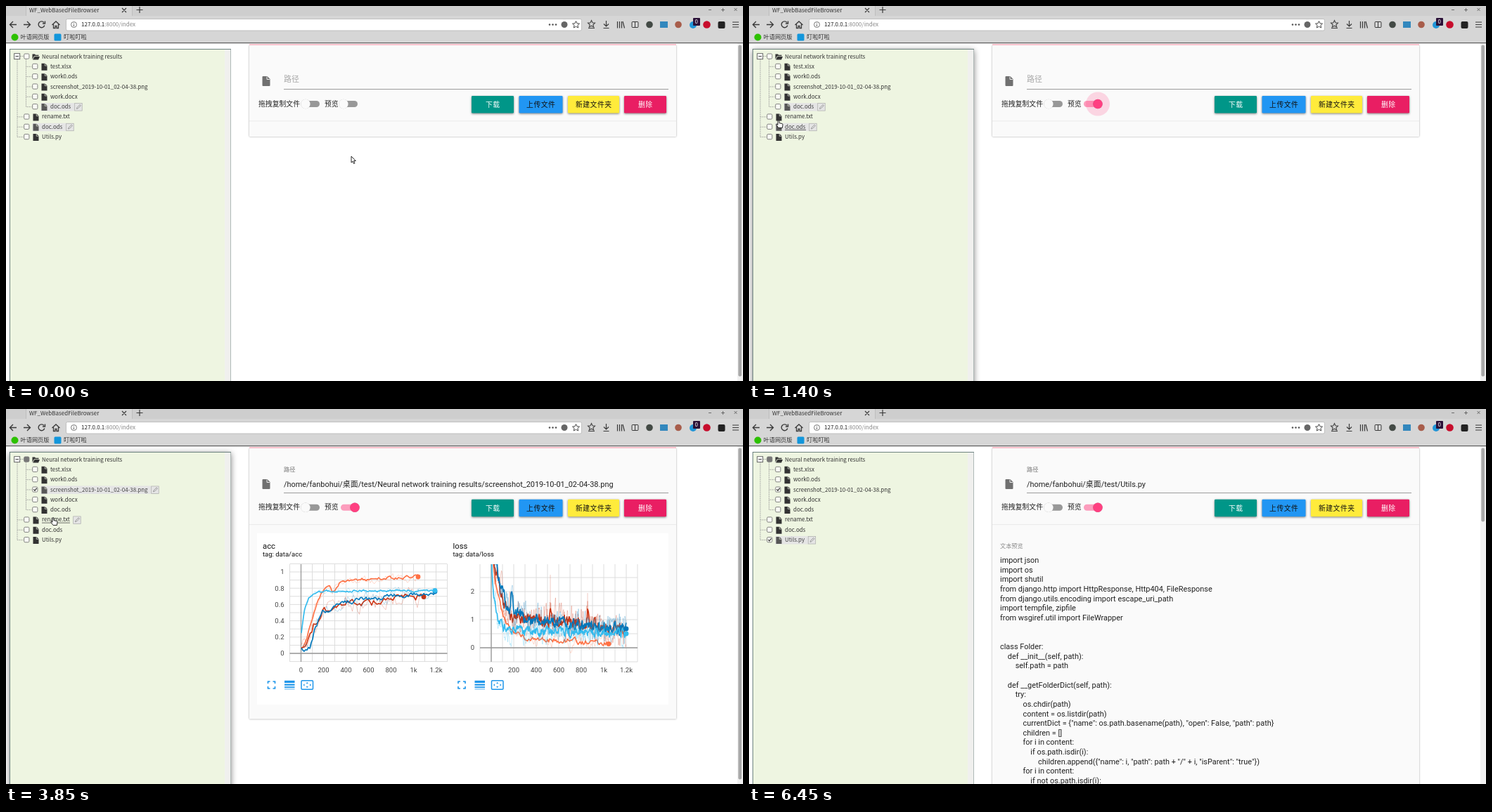
Write an HTML page that moves like this. It is 1048 px wide and 534 px high and loops after 6.5 s.

```html
<!DOCTYPE html>
<html lang="zh">
<head>
<meta charset="utf-8">
<title>File browser</title>
<style>
html, body { margin: 0; width: 100%; height: 100%; overflow: hidden; background: #fff; }
svg { display: block; width: 1048px; height: 534px; }
text { white-space: pre; }
.ui { font-family: "Noto Sans CJK SC", "Noto Sans CJK JP", "Noto Sans CJK", sans-serif; }
.app { font-family: Roboto, "Noto Sans CJK SC", "Noto Sans CJK JP", "Noto Sans CJK", sans-serif; }
</style>
</head>
<body>
<svg id="stage" viewBox="0 0 1048 534"></svg>
<script>
const LOOP = 6500, STEP = 50;
const IMAGE_AT = 2850, CODE_AT = 5050;
const PINK = '#ff4081';

const clamp = v => Math.max(0, Math.min(1, v));
const ramp = (t, start, length) => clamp((t - start) / length);
const smooth = k => k * k * (3 - 2 * k);
const shadow = (y, blur, alpha) => `style="filter:drop-shadow(0 ${y}px ${blur}px rgba(0,0,0,${alpha}))"`;

// Drawing helpers; text is placed by its vertical centre.
const rect = (x, y, w, h, fill, more = '') =>
  `<rect x="${x}" y="${y}" width="${w}" height="${h}" fill="${fill}" ${more}/>`;
const circle = (x, y, r, fill, more = '') => `<circle cx="${x}" cy="${y}" r="${r}" fill="${fill}" ${more}/>`;
const line = (d, stroke, width = 1, more = '') =>
  `<path d="${d}" fill="none" stroke="${stroke}" stroke-width="${width}" ${more}/>`;
const shape = (d, fill, more = '') => `<path d="${d}" fill="${fill}" ${more}/>`;
const label = (x, y, str, size, fill, font = 'ui', more = '') =>
  `<text class="${font}" x="${x}" y="${y + size * .36}" font-size="${size}" fill="${fill}" ${more}>${str}</text>`;
const at = (x, y, content) => `<g transform="translate(${x} ${y})">${content}</g>`;

function browserChrome() {
  const ink = '#3a3a3a';
  const star = 'M0-5L1.5-1.7 5-1.4 2.4 1 3.2 4.5 0 2.7-3.2 4.5-2.4 1-5-1.4-1.5-1.7Z';
  return rect(0, 0, 1048, 53, '#d6d6d6') + rect(0, 0, 1048, 14, '#cecece') + rect(28, 0, 152, 14, '#d6d6d6') +
    line('M28.5 0V14M179.5 0V14', '#b4b4b4', .7) +
    label(33, 6, 'WF_WebBasedFileBrowser', 8, '#333') +
    line('M165 3l6 6m0-6l-6 6M185.5 5.5h9m-4.5-4.5v9', ink, 1.2) +
    line('M999 5.5h4M1017 5.5h5m-2.5-2.5v5M1035.5 3l4 4m0-4l-4 4', '#555', .8) +
    line('M15 26.5H5.5m4.5-4.5L5.5 26.5 10 31M25 26.5h9.5M30 22l4.5 4.5L30 31', ink, 1.4) +
    line('M54 23.5a4.4 4.4 0 1 0 .8 4M55.5 21.5v3.5h-3.5', ink, 1.4) +
    line('M65.5 27l5.5-5 5.5 5M67.5 26v5.5h2.5v-3h2v3h2.5V26', ink, 1.3) +
    rect(85.5, 18.5, 733, 16.5, '#fff', 'rx="2" stroke="#b5b5b5" stroke-width=".8"') +
    circle(96.5, 26.5, 4, 'none', 'stroke="#666" stroke-width=".9"') + line('M96.5 26v3M96.5 24v1', '#666') +
    label(107, 26.5, '127.0.0.1<tspan fill="#888">:8000/index</tspan>', 8, '#222') +
    [773, 777.5, 782].map(x => circle(x, 26.5, 1.3, '#555')).join('') +
    circle(794, 26.5, 4.5, '#666') +
    at(810.5, 26.5, line(star, '#444', 1)) + at(832.5, 25.5, line(star, '#444', 1.1)) +
    line('M828 31.5h9M853.5 21v8m-3.5-3.5l3.5 3.5 3.5-3.5M849.5 31.5h8', ink, 1.2) +
    line('M869.5 22v9.5M872.5 22v9.5M875.5 22v9.5M877 22l2.5 9.5', ink, 1.2) +
    rect(890, 22.5, 9, 8, 'none', 'rx="1" stroke="#3a3a3a"') + line('M894.5 22v9', ink) +
    circle(915, 26.5, 4.8, '#434a45') + rect(930, 22, 11, 9, '#3287bd') +
    circle(956, 26.5, 4.8, '#a85d4b') + circle(977, 27, 5, '#2196d8') +
    rect(977, 17, 10, 11, '#2b1138', 'rx="1"') + label(979.6, 22.5, '0', 8, '#fff') +
    circle(996.5, 26.5, 5.3, '#c70d2c') + rect(1012.5, 22, 10, 10, '#222', 'rx="2"') +
    line('M1033 23h9m-9 3.5h9m-9 3.5h9', ink, 1.2);
}

function bookmarks(t) {
  return (t >= 6000 && t < 6450 ? rect(5, 38.5, 59, 12.5, '#c2c2c2', 'rx="1"') : '') +
    circle(12.5, 44.5, 5, '#2dc100') + label(20.5, 44.5, '叶语网页版', 8.2, '#333') +
    rect(68.5, 39.5, 10, 10, '#1296db', 'rx="1.5"') + label(82, 44.5, '叮啦叮啦', 8.2, '#333') +
    rect(0, 52, 1048, 1.2, '#5c5c5c');
}

// Rows: indent level, name, right end of the name.
const rows = [
  [0, 'Neural network training results', 166], [1, 'test.xlsx', 93], [1, 'work0.ods', 102],
  [1, 'screenshot_2019-10-01_02-04-38.png', 202], [1, 'work.docx', 102], [1, 'doc.ods', 93],
  [0, 'rename.txt', 91], [0, 'doc.ods', 81], [0, 'Utils.py', 79.5]
];
const fileIcon = 'M0 0h5l3 3v7h-8z';

function treeRow([level, name, end], i, t, hovered, selected) {
  const y = 72 + i * 14.32, x = level * 12;
  const checked = i === 3 && t >= IMAGE_AT || i === 8 && t >= CODE_AT;
  const partial = i === 0 && t >= IMAGE_AT;
  const fade = selected ? 'opacity=".8"' : '';
  let out = selected ? rect(x + 37.5, y - 5.5, end - x - 33, 11.5, '#e5e5e5') : '';
  out += rect(x + 25.7, y - 4, 7.2, 7.2, partial ? '#777' : '#fafbf5', 'rx="1.5" stroke="#777" stroke-width=".9"');
  if (checked) out += line(`M${x + 27.3} ${y - .5}l1.7 1.8 2.7-3.6`, '#333', 1.2);
  out += i === 0
    ? at(37.5, y - 3.5, shape('M0 0h3.5l1 1.2H9v1.5H2.5L0 7.5z', '#333') + shape('M3 3.5h7.5L8.5 8H.6z', '#333'))
    : at(x + 38.5, y - 4.5, shape(fileIcon, '#333', fade) + line('M4.8 0v3.2H8', '#eff4e4', .7));
  out += label(x + 51, y - .3, name, 7.94, selected ? '#444' : '#333');
  if (hovered) out += rect(x + 51, y + 3.8, end - x - 51, .7, '#333');
  if (selected || hovered) out += rect(end + 4.7, y - 5, 10.5, 10.5, '#e5e5e5', 'stroke="#aaa" stroke-width=".7"') +
    line(`M${end + 7.5} ${y + 2.8}l.6-1.9 4-4 1.3 1.3-4 4z`, '#888', .8);
  return out;
}

function sidebar(t) {
  const hoverShade = ramp(t, 1050, 250) * (t < 6000);
  const hovered = t < 1400 || t >= 6000 ? -1 : t < 2300 ? 7 : t < 2550 ? -1 : t < 3850 ? 3 : t < 4200 ? 6 : 8;
  const selected = t < IMAGE_AT ? [5, 7] : t < CODE_AT ? [3] : [8];
  const branches = [6, 7, 8].map(i => `M16 ${72 + i * 14.32}h9`).join('') +
    [1, 2, 3, 4, 5].map(i => `M28.5 ${72 + i * 14.32}h8`).join('');
  return rect(5, 61, 315, 490, '#f0f6e4', shadow(2, 4, .5 * hoverShade)) +
    rect(5.5, 61.5, 314, 490, '#eef5e1', 'stroke="#617775" stroke-width=".9"') +
    rect(311, 62, 8.5, 480, '#f0f0ee') +
    line('M16 76V186.5M28.5 76V143.5M20 71.5h5' + branches, '#999', .8, 'stroke-dasharray="1 .5"') +
    rect(11.7, 67.7, 8, 8, '#fff', 'stroke="#555" stroke-width=".9"') + line('M13.5 71.7h4.5', '#333') +
    rows.map((row, i) => treeRow(row, i, t, i === hovered, selected.includes(i))).join('');
}

function toggle(x, y, k, haloRadius) {
  const thumb = circle(x + 4 + 16 * k, y, 6.7,
    `color-mix(in srgb, ${PINK} ${k * 100}%, #fafafa)`, shadow(.6, .7, .35));
  const halo = circle(x + 4 + 16 * k, y, haloRadius, k < .5 ? '#a05a70' : PINK, 'opacity=".2"');
  return rect(x, y - 4.5, 24, 9, `color-mix(in srgb, #fc9dbd ${k * 100}%, #989898)`, 'rx="4.5"') +
    (k < .5 ? thumb + halo : halo + thumb);
}

const buttons = [
  [662, 60, '下载', '#009688', '#fff'], [729.5, 62, '上传文件', '#2196f3', '#111'],
  [799, 73, '新建文件夹', '#ffeb3b', '#111'], [879, 60, '删除', '#e91e63', '#fff']
];

function cardRipple(t) {
  const scale = t < 720 ? .21 * ramp(t, 520, 200) : .21 + .79 * smooth(ramp(t, 720, 300));
  const opacity = .1 * (1 - ramp(t, 950, 250));
  return scale > 0 && opacity > 0
    ? circle(484 + 165 * scale, 139 - 29 * scale, 309 * scale, '#000', `opacity="${opacity}" clip-path="url(#header)"`) : '';
}

function header(t) {
  const filled = t >= IMAGE_AT, dy = filled ? .8 : 0;
  const file = t < CODE_AT ? 'Neural network training results/screenshot_2019-10-01_02-04-38.png' : 'Utils.py';
  const on = smooth(ramp(t, 720, 200));
  const haloRadius = filled ? 0 : 17 * ramp(t, 520, 260);
  return cardRipple(t) +
    shape('M365.5 100h6l4 4v9q0 1-1 1h-9q-1 0-1-1v-12q0-1 1-1z', '#707070') + line('M371 100.5v4h4', '#fafafa', .9) +
    (filled
      ? label(395, t < 3150 ? 87 : 86, '路径', 8.19, '#757575', 'app') +
        label(395, 107, '/home/fanbohui/桌面/test/' + file, 10.92, '#212121', 'app')
      : label(395, 104.5, '路径', 10.92, '#a6a6a6', 'app')) +
    at(0, dy, rect(395, 118.2, 547, .8, '#858585') +
      label(359, 139, '拖拽复制文件', 9.83, '#212121', 'app') + toggle(422, 139.5, 0, 0) +
      label(453, 139, '预览', 9.83, '#212121', 'app') + toggle(476, 139.5, on, haloRadius) +
      buttons.map(([x, w, name, fill, ink]) => rect(x, 128, w, 24.5, fill, 'rx="1.2" ' + shadow(1, 1.4, .5)) +
        label(x + w / 2 + .25, 140.2, name, 9.83, ink, 'app', 'text-anchor="middle" letter-spacing=".5"')).join('') +
      rect(346, 163.5, 607, .8, '#e6e6e6'));
}

// Charts: noisy curves through a few points, each over a pale, wilder copy.
let seed = 71;
const random = () => (seed = seed * 16807 % 2147483647) / 2147483647;

function noisyPath(points, amp, step) {
  const out = [];
  let k = 0, drift = 0;
  for (let x = points[0]; x <= points[points.length - 2]; x += step) {
    while (k + 4 < points.length && x > points[k + 2]) k += 2;
    const [x0, y0, x1, y1] = points.slice(k, k + 4);
    drift = .55 * drift + (random() - .5) * amp;
    out.push(x.toFixed(1) + ' ' + (y0 + (y1 - y0) * (x - x0) / (x1 - x0) + drift).toFixed(1));
  }
  return 'M' + out.join('L');
}

function series(color, amp, step, points, dot = true) {
  const [x, y] = points.slice(-2);
  return line(noisyPath(points, amp * 2.6, step), color, 1, 'opacity=".25"') +
    line(noisyPath(points, amp, step), color, 1.6, 'stroke-linejoin="round"') +
    (dot ? circle(x, y, 3.4, color) : '');
}

function chart(x, title, tag, zero, gap, yLabels, curves) {
  const blue = '#1e96ea', left = x - 38.5;
  let grid = '', out = '';
  for (let i = 0; i < 15; i++) grid += `M${x + i * 16} 221V360`;
  for (let y = zero + gap; y > 220; y -= gap) grid += `M${x} ${y}h224`;
  out += line(grid, '#dadada', .9) + line(`M${x + 16} 221V360M${x} ${zero}h224`, '#999', 1.3);
  yLabels.forEach((v, i) => out += label(x - 8, zero - i * 2 * gap, v, 9.5, '#444', 'app', 'text-anchor="end"'));
  ['0', '200', '400', '600', '800', '1k', '1.2k'].forEach((v, i) =>
    out += label(x + 16 + i * 32, 371.5, v, 9.5, '#444', 'app', 'text-anchor="middle"'));
  out += label(left, 194.5, title, 11.3, '#111', 'app') + label(left, 207, tag, 9.5, '#111', 'app');
  out += at(left + 12.5, 393, line('M-5-2v-3h3M2-5h3v3M5 2v3h-3M-2 5h-3v-3', blue, 1.6) +
    shape('M18.5-6.2H33v3.1H18.5zM18.5-1.6H33V.8H18.500zM18.5 2.3H33v1.600H18.5zM18.5 5.4H33v.9H18.5z', blue) +
    rect(42.5, -6.3, 16.5, 12.6, 'none', `rx="1.3" stroke="${blue}" stroke-width="1.5"`) +
    shape('M50.7-4l1.7 2h-3.4zM50.7 4l1.7-2h-3.4zM45 0l2-1.7v3.4zM56.5 0l-2-1.7v3.4z', blue));
  return out + `<g clip-path="url(#plots)">${curves}</g>`;
}

const BLUE = '#0077bb', SKY = '#33bbee', RED = '#cc3311', ORANGE = '#ff7043';
const charts = rect(357, 177, 585, 244, '#fff', shadow(.5, .7, .2)) +
  chart(403.5, 'acc', 'tag: data/acc', 348, 11.6, ['0', '0.2', '0.4', '0.6', '0.8', '1'],
    series(ORANGE, 4, 2, [420, 340, 425, 335, 432, 310, 440, 282, 448, 264, 460, 250, 465, 260, 475, 247, 500, 243, 540, 241, 586, 239]) +
    series(RED, 9, 2.5, [420, 341, 428, 336, 438, 308, 450, 288, 470, 282, 485, 273, 505, 279, 530, 274, 550, 269, 594, 267.5]) +
    series(BLUE, 6, 2, [420, 342, 432, 341, 440, 310, 450, 290, 465, 283, 485, 276, 510, 269, 530, 271, 550, 266, 600, 264, 610, 260]) +
    series(SKY, 2.5, 1.5, [420, 320, 424, 288, 430, 270, 440, 262, 460, 259, 610, 258.5])) +
  chart(674, 'loss', 'tag: data/loss', 340, 20, ['0', '1', '2'],
    series(ORANGE, 8, 1.5, [692, 215, 700, 268, 706, 292, 715, 312, 735, 325, 760, 329, 857, 334.5]) +
    series(RED, 14, .6, [692, 210, 700, 240, 708, 278, 720, 295, 750, 301, 772, 303, 774, 276, 777, 300, 825, 305, 827, 288, 829, 306, 882, 315], false) +
    line('M774 300V236M827 300V262', RED, 1, 'opacity=".25"') +
    series(BLUE, 13, .6, [694, 210, 702, 245, 710, 272, 717, 287, 719, 252, 722, 286, 735, 298, 760, 303, 800, 306, 850, 312, 882, 313]) +
    series(SKY, 10, .6, [690, 215, 694, 270, 700, 300, 706, 310, 716, 316, 882, 320]));

const code = `import json
import os
import shutil
from django.http import HttpResponse, Http404, FileResponse
from django.utils.encoding import escape_uri_path
import tempfile, zipfile
from wsgiref.util import FileWrapper


class Folder:
    def __init__(self, path):
        self.path = path

    def __getFolderDict(self, path):
        try:
            os.chdir(path)
            content = os.listdir(path)
            currentDict = {"name": os.path.basename(path), "open": False, "path": path}
            children = []
            for i in content:
                if os.path.isdir(i):
                    children.append({"name": i, "path": path + "/" + i, "isParent": "true"})
            for i in content:
                if not os.path.isdir(i):`;
const codeView = label(357, 195, '文本预览', 8.19, '#8a8a8a', 'app') +
  code.split('\n').map((str, i) => label(357, 215.2 + i * 13.65, str, 10.92, '#212121', 'app')).join('');

function mainCard(t) {
  const height = t < IMAGE_AT ? 130 : t < CODE_AT ? 385.5 : 600;
  const hoverShade = ramp(t, 250, 200) * (1 - ramp(t, 1050, 300));
  return rect(346, 56, 607, 108, '#fafafa', shadow(2, 4, .4 * hoverShade)) +
    rect(346, 56, 607, height, '#fafafa', 'rx="1" ' + shadow(.8, 1, .4)) +
    rect(346, 54, 607, 2, '#f8bfca') + header(t) +
    (t < IMAGE_AT ? '' : t < CODE_AT ? charts : codeView) +
    rect(1040, 53, 8, 481, '#f1f1f1') + rect(1041.3, 55.5, 4.7, t < CODE_AT ? 472 : 105, '#a8a8a8', 'rx="2.3"');
}

// Pointer stops: arrival time, travel time, x, y.
const stops = [
  [400, 200, 485, 138], [1200, 250, 190, 112], [1400, 200, 42, 163], [2300, 50, 40, 111], [2550, 50, 67, 114],
  [3850, 50, 67, 155], [4200, 50, 70, 185], [4500, 50, 67, 186], [5550, 50, 67, 174], [6000, 50, 30, 29]
];

function pointer(t) {
  if (t >= 6450) return '';
  let x = 491, y = 214;
  for (const [end, travel, toX, toY] of stops) {
    const k = ramp(t, end - travel, travel);
    x += (toX - x) * k;
    y += (toY - y) * k;
  }
  const hand = t >= 400 && t <= 950 || t >= 1400 && t < 6000;
  return at(x, y, hand
    ? shape('M-1 1q0-1.5 1-1.5T1 1v2.7l4 .8q1 .3 1 1.3l-.6 4.7h-5.4L-3 6.5q-.5-1.5.8-1.2L-1 6.3z',
      '#fff', 'stroke="#111" stroke-width=".9" stroke-linejoin="round"')
    : shape('M0 0v9l2-1.8 1.5 3.3 1.5-.7L3.5 6.5h2.8z', '#fff', 'stroke="#111" stroke-width=".9"'));
}

const defs = `<defs><clipPath id="header">${rect(346, 56, 607, 108, '#000')}</clipPath>` +
  `<clipPath id="plots">${rect(403, 221, 497, 140, '#000')}</clipPath></defs>`;
const chrome = browserChrome();
const stage = document.getElementById('stage');
let shown = -1;

function frame(now) {
  const t = Math.floor(now % LOOP / STEP) * STEP;
  if (t !== shown) {
    shown = t;
    stage.innerHTML = defs + mainCard(t) + sidebar(t) + chrome + bookmarks(t) + pointer(t);
  }
  requestAnimationFrame(frame);
}
frame(0);
</script>
</body>
</html>
```
